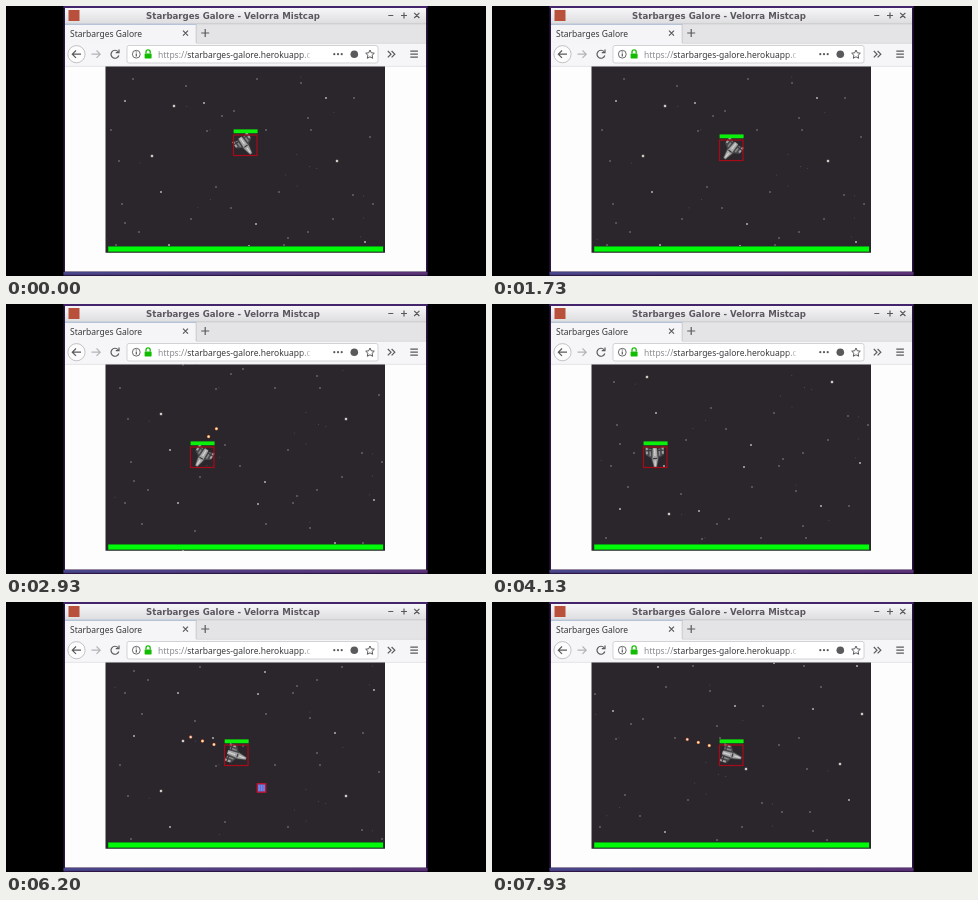
An HTML page for the animation above (8 s loop, 480 by 270 pixels).

```html
<!DOCTYPE html>
<html lang="en">
<head>
<meta charset="utf-8">
<title>Starbarges Galore</title>
<style>
  html, body { margin: 0; width: 100%; height: 100%; overflow: hidden; background: #000; }
  svg { display: block; width: 100vw; height: 100vh; }
  .ui { font-family: "Noto Sans", "Open Sans", sans-serif; font-size: 8.5px; }
  .line { fill: none; stroke: #5a5a5d; stroke-width: 1.2; }
</style>
</head>
<body>
<svg viewBox="0 0 480 270" xmlns="http://www.w3.org/2000/svg">
  <defs>
    <clipPath id="view"><rect x="99.500" y="60.500" width="279.500" height="186.300"/></clipPath>
    <linearGradient id="fade" gradientUnits="userSpaceOnUse" x1="294" x2="306" y1="0" y2="0">
      <stop stop-color="#38383b"/><stop offset="1" stop-color="#38383b" stop-opacity="0"/>
    </linearGradient>
    <linearGradient id="bar" x2="0" y2="1">
      <stop stop-color="#f6f5f7"/><stop offset="1" stop-color="#dddcdf"/>
    </linearGradient>
    <linearGradient id="edge">
      <stop stop-color="#48468a"/><stop offset="1" stop-color="#5c3276"/>
    </linearGradient>
    <radialGradient id="spark">
      <stop offset=".2" stop-color="#fff0c8"/><stop offset=".55" stop-color="#e8935a"/>
      <stop offset="1" stop-color="#8a2c20" stop-opacity="0"/>
    </radialGradient>
    <radialGradient id="ember">
      <stop offset=".2" stop-color="#ffe8d8"/><stop offset=".55" stop-color="#d08060"/>
      <stop offset="1" stop-color="#8a2020" stop-opacity="0"/>
    </radialGradient>
    <g id="tile"></g>
  </defs>

  <!-- window -->
  <rect width="480" height="270" fill="#000"/>
  <rect x="57.500" width="364" height="270" fill="#2c1646"/>
  <rect x="57.500" width="364" height="2" fill="#44246a"/>
  <rect x="57.500" y="266" width="364" height="2.800" fill="url(#edge)"/>
  <rect x="59" y="2" width="361" height="16" fill="url(#bar)"/>
  <rect x="59" y="17.500" width="361" height="20" fill="#e4e4e6"/>
  <rect x="59" y="18" width="131" height="20" fill="#f5f5f7"/>
  <path d="M190 17.800H420M190.200 18V37" stroke="#c4c4c7" stroke-width=".8"/>
  <path d="M59 18.200H190" stroke="#98aec8"/>
  <rect x="59" y="37" width="361" height="24" fill="#f6f6f8"/>
  <path d="M190 37.300H420M59 60.400H420" stroke="#d0d0d3" stroke-width=".7"/>
  <rect x="59" y="60.700" width="361" height="204.800" fill="#fdfdfd"/>

  <!-- title bar -->
  <rect x="62.500" y="4" width="11" height="11" fill="#b8503c"/>
  <text x="227" y="12.700" text-anchor="middle" fill="#5c565f" font-size="8.600" font-weight="bold"
    font-family="'DejaVu Sans', sans-serif">Starbarges Galore - Velorra Mistcap</text>
  <path class="line" d="M382.300 9.500h5M395 9.500h6M398 6.500v6M408.200 6.800l5.200 5.200M413.400 6.800l-5.200 5.200"/>

  <!-- tab -->
  <text class="ui" x="64" y="30.500" fill="#38383c">Starbarges Galore</text>
  <path class="line" d="M177 24.700l5 5M182 24.700l-5 5M195.200 27h8M199.200 23v8"/>

  <!-- toolbar -->
  <circle cx="70.500" cy="48.200" r="8.600" fill="#fcfcfd" stroke="#b4b4b8" stroke-width=".8"/>
  <path class="line" d="M75 48.200H66.500M70 44.500L66.300 48.200L70 51.900"/>
  <path class="line" style="stroke:#b4b4b8" d="M85.500 48.200H94M90.500 44.500L94.200 48.200L90.500 51.900"/>
  <path class="line" d="M112 45.600A4 4 0 1 0 112.800 49.500M113 43.500V46.700H109.800"/>
  <rect x="121" y="39.500" width="251" height="17.500" rx="2" fill="#fff" stroke="#c8c8cc" stroke-width=".8"/>
  <circle cx="130.300" cy="48.200" r="3.900" class="line" style="stroke-width:.9"/>
  <path class="line" d="M130.300 47.500v3M130.300 45.600v1"/>
  <rect x="138.600" y="47.400" width="7" height="5" rx=".6" fill="#12bc00"/>
  <path d="M140 47.500v-1.600a2.100 2.100 0 0 1 4.200 0v1.600" fill="none" stroke="#12bc00" stroke-width="1.300"/>
  <text class="ui" x="152" y="51.500" fill="#8b8b90">https://<tspan fill="url(#fade)">starbarges-galore.herokuapp.c</tspan></text>
  <g fill="#5a5a5d">
    <circle cx="328.300" cy="48.200" r="1.100"/><circle cx="332" cy="48.200" r="1.100"/><circle cx="335.700" cy="48.200" r="1.100"/>
    <circle cx="348.300" cy="48.200" r="3.800"/>
  </g>
  <path class="line" style="stroke-width:1" d="M364 44l1.300 2.800 3 .4-2.200 2.100.6 3-2.700-1.500-2.700 1.500.6-3-2.200-2.100 3-.4z"/>
  <path class="line" d="M381.800 45l3.200 3.200-3.200 3.200M385.600 45l3.200 3.200-3.200 3.200M404.300 45.200h7.600M404.300 48.200h7.600M404.300 51.200h7.600"/>

  <!-- game -->
  <g clip-path="url(#view)">
    <rect x="99" y="60" width="281" height="188" fill="#2b262c"/>
    <g id="sky">
      <use href="#tile"/><use href="#tile" x="-279"/>
      <use href="#tile" y="-187"/><use href="#tile" x="-279" y="-187"/>
    </g>
    <g id="trail"></g>
    <g id="crate">
      <rect x="-4" y="-4" width="8" height="8" fill="#5a70d8"/>
      <path d="M-3 -2H3M-3 0H3M-3 2H3" stroke="#9aa8ee" stroke-width=".9" stroke-dasharray="1.300 1.200"/>
      <rect x="-4.200" y="-4.200" width="8.400" height="8.400" fill="none" stroke="#c81430" stroke-width="1.300"/>
    </g>
    <g id="ship">
      <g id="hull">
        <path d="M-10 -9H-2L1 -4L11 -1.500V1.500L1 4L-2 9H-10L-8 3V-3Z" fill="#48484b"/>
        <path d="M-9.500 -8H-3M-9.500 8H-3" stroke="#a4a4a4" stroke-width="2"/>
        <path d="M-8 -4.600H-1M-8 4.600H-1" stroke="#858587" stroke-width="1.500"/>
        <path d="M-9 -2L3 -2.600L10.500 -1V1L3 2.600L-9 2Z" fill="#a6a6a6"/>
        <path d="M-6.500 -9V-3M-6.500 3V9M1.500 -2V2" stroke="#3a3a3d" stroke-width="1.200"/>
        <path d="M3.500 0H9M-8 0H-1" stroke="#d6d6d6" stroke-width="1.100"/>
      </g>
      <rect x="-11.500" y="-10" width="23.500" height="20.500" fill="none" stroke="#a80a18" stroke-width="1.200"/>
      <rect x="-11.400" y="-15.600" width="24" height="3.800" fill="#0bf00b"/>
    </g>
    <rect x="101.800" y="240" width="275.700" height="6.200" fill="#14581a"/>
    <rect x="102.300" y="240.600" width="274.700" height="4.900" fill="#00fb08"/>
  </g>
</svg>
<script>
const NS = "http://www.w3.org/2000/svg";
const $ = id => document.getElementById(id);
const LOOP = 8000, W = 279, H = 187, LEFT = 100, TOP = 61;

function add(parent, tag, attrs) {
  const el = document.createElementNS(NS, tag);
  for (const k in attrs) el.setAttribute(k, attrs[k]);
  return parent.appendChild(el);
}
const move = (el, x, y) => el.setAttribute("transform", `translate(${x.toFixed(2)} ${y.toFixed(2)})`);
const mod = (a, n) => ((a % n) + n) % n;

// Star tile: bright, medium, small, then faint seeded specks
const bright = [168,100, 146,150, 331,155];
const medium = [198,97, 320,92, 119,95, 155,186, 250,218, 163,239, 359,236, 243,240];
const small = [127,73, 180,80, 251,73, 295,77, 348,92, 228,105, 260,124, 305,124, 201,125,
  105,124, 364,131, 113,155, 210,181, 273,186, 347,189, 367,198, 225,202, 119,217, 185,213,
  133,226, 282,232, 302,226, 327,213, 278,239, 110,239, 216,110, 302,112, 116,198];
function stars(list, r, fill) {
  for (let i = 0; i < list.length; i += 2)
    add($("tile"), "circle", { cx: list[i], cy: list[i + 1], r, fill });
}
let seed = 7;
const rnd = () => (seed = seed * 16807 % 2147483647) / 2147483647;
const specks = Array.from({ length: 32 }, (_, i) => i % 2 ? TOP + rnd() * H : LEFT + rnd() * W);
stars(specks, .5, "#544f56");
stars(small, .8, "#928d92");
stars(medium, 1, "#b4afb2");
stars(bright, 1.7, "#625c5f");
stars(bright, 1.05, "#efe9e0");

// Flight path: time, world x, world y
const path = [[0, 239, 139], [930, 239, 139], [1730, 234, 144], [2930, 187, 193],
  [4130, 154, 230], [5130, 166, 272], [6200, 221, 301], [7930, 316, 328]];
const turns = [[0, 55], [870, 132], [2930, 122], [4130, 88], [5130, 52], [5640, 12], [6200, 20], [8000, 17]];

function segment(keys, t) {
  let i = 0;
  while (i < keys.length - 2 && t >= keys[i + 1][0]) i++;
  return i;
}
function slope(i, c) {
  if (i < 2) return 0;
  const a = path[i - 1], b = path[Math.min(i + 1, path.length - 1)];
  return (b[c] - a[c]) / (b[0] - a[0]);
}
function along(t, c) {
  const i = segment(path, t), a = path[i], b = path[i + 1];
  const d = b[0] - a[0], u = Math.min(1, (t - a[0]) / d), v = 1 - u;
  return a[c] * v * v * (1 + 2 * u) + b[c] * u * u * (3 - 2 * u)
    + d * u * v * (slope(i, c) * v - slope(i + 1, c) * u);
}
function heading(t) {
  const i = segment(turns, t), [t0, a] = turns[i], [t1, b] = turns[i + 1];
  return a + (b - a) * (t - t0) / (t1 - t0);
}

// Exhaust sparks stay where the engine left them
const STEP = 200, LIFE = 890, ENGINE = 18, SKEW = 4;
const burns = [[1780, 1980], [2700, 2900], [4280, 5130], [5780, 6850], [7520, 8000]];
const sparks = [];
for (const [from, to] of burns)
  for (let t = from; t <= to; t += STEP) {
    const a = heading(t) * Math.PI / 180;
    sparks.push({
      t,
      x: along(t, 1) - SKEW - ENGINE * Math.cos(a),
      y: along(t, 2) - SKEW - ENGINE * Math.sin(a),
      el: add($("trail"), "circle", { r: 2.2 })
    });
  }

function draw(t) {
  const x = along(t, 1), y = along(t, 2);
  const camX = Math.min(9, 239 - x), camY = Math.min(0, 153 - y);
  move($("sky"), mod(camX, W), mod(camY, H));
  move($("ship"), x + camX, y + camY);
  $("hull").setAttribute("transform", `rotate(${heading(t).toFixed(1)})`);

  for (const s of sparks) {
    const age = t - s.t, on = age >= 0 && age < LIFE;
    s.el.setAttribute("visibility", on ? "visible" : "hidden");
    if (!on) continue;
    move(s.el, s.x + camX, s.y + camY);
    s.el.setAttribute("fill", age < 330 ? "url(#spark)" : "url(#ember)");
  }

  // The crate drifts upward until the ship collects it
  const k = t - 6200;
  $("crate").setAttribute("visibility", t > 4500 && t < 6640 ? "visible" : "hidden");
  move($("crate"), 246.5 - .0056 * k + camX, 334 - .0243 * k + camY);
}

const start = performance.now();
function tick() {
  draw((performance.now() - start) % LOOP);
  requestAnimationFrame(tick);
}
draw(0);
requestAnimationFrame(tick);
</script>
</body>
</html>
```
